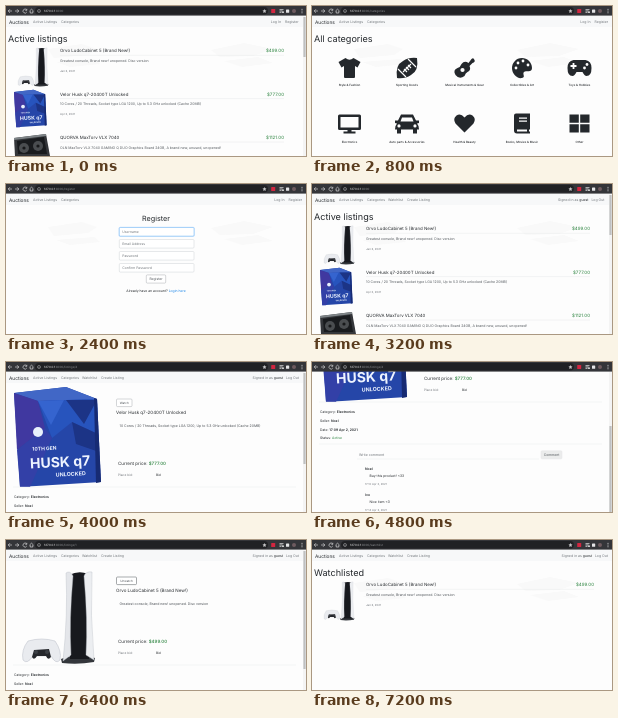
Recreate the animation shown at these times as an HTML page. Size 300 by 150 pixels, loop 8 s.

```html
<!DOCTYPE html>
<html lang="en">
<head>
<meta charset="utf-8">
<title>Auctions</title>
<style>
html, body { margin: 0; width: 100%; height: 100%; overflow: hidden; background: #fcfcfc; }
svg { display: block; width: 100vw; height: 100vh; font-family: Inter, sans-serif; text-rendering: geometricPrecision; }
.page { opacity: 0; animation: show 8s step-end infinite; }
@keyframes show { 0% { opacity: 1 } 10%, 100% { opacity: 0 } }
</style>
</head>
<body>
<svg id="stage" viewBox="0 0 300 150" preserveAspectRatio="none"></svg>
<script>
const INK = '#24282c', GRAY = '#72777c', GREEN = '#27803b', BLUE = '#1683e8', PAPER = '#fdfdfd';
const CONSOLE = 'Orvo LudoCabinet 5 (Brand New!)';
const CHIP = 'Velor Husk q7-20400T Unlocked';
const CARD = 'QUORVA MaxTorv VLX 7040';
const CONSOLE_INFO = 'Greatest console, Brand new! unopened. Disc version';
const CHIP_INFO = '10 Cores / 20 Threads, Socket type LGA 1200, Up to 5.3 GHz unlocked (Cache 20MB)';
const CARD_INFO = 'OLN MaxTorv VLX 7040 GAMING Q DUO Graphics Board 24GB, A brand new, unused, unopened!';

const text = (x, y, size, str, fill = INK, more = '') =>
  `<text x="${x}" y="${y}" font-size="${size}" fill="${fill}" ${more}>${str}</text>`;
const END = 'text-anchor="end"', MID = 'text-anchor="middle"';
const rect = (x, y, w, h, fill, more = '') =>
  `<rect x="${x}" y="${y}" width="${w}" height="${h}" fill="${fill}" ${more}/>`;
const path = (d, fill = INK, more = '') => `<path d="${d}" fill="${fill}" ${more}/>`;
const stroke = (d, color, width) => path(d, 'none', `stroke="${color}" stroke-width="${width}"`);
const circle = (x, y, r, fill = INK) => `<circle cx="${x}" cy="${y}" r="${r}" fill="${fill}"/>`;
const line = (x1, x2, y) => stroke(`M${x1} ${y}H${x2}`, '#e1e3e5', .4);
const group = (transform, body) => `<g transform="${transform}">${body}</g>`;
const bold = str => `<tspan font-weight="600">${str}</tspan>`;
const colored = (str, fill) => `<tspan fill="${fill}">${str}</tspan>`;

const browser = url => rect(0, 0, 300, 9.6, '#343539') +
  rect(29, 1, 233, 7.6, '#202124', 'rx="3.8"') +
  stroke('M6 5H2.2M4 3.2L2.2 5L4 6.8M9 5h3.8M11 3.2L12.8 5L11 6.8', '#e4e4e6', .6) +
  stroke('M20.6 3.8a2 2 0 1 0 .2 2.2M20.8 2.8v1.5h-1.5M23.5 5L25.5 3.2L27.5 5M24.2 5v2h2.6v-2', '#ececee', .6) +
  stroke('M31.5 5a1.5 1.5 0 1 0 3 0a1.5 1.5 0 1 0-3 0M33 4.8v1', '#d0d0d2', .45) +
  text(38, 6.2, 2.95, `127.0.0.1${colored(':8000' + url, '#8e9093')}`, '#f4f4f4') +
  path('M258.5 3l.6 1.3 1.4.2-1 1 .2 1.4-1.2-.7-1.2.7.2-1.4-1-1 1.4-.2z', '#c4c4c6') +
  rect(265.2, 3, 4, 4, '#d22640', 'rx=".6"') +
  stroke('M273.5 3.6h4M273.5 5h3M273.5 6.4h2', '#eee', .7) + circle(277, 6.2, .9, '#eee') +
  rect(280, 3.4, 3.2, 3.4, '#e4e4e6', 'rx=".6"') + circle(288, 5, 2, '#6e5b60') +
  [3.2, 5, 6.8].map(y => circle(296, y, .5, '#eee')).join('');

const blank = rect(0, 0, 300, 150, PAPER);
const backdrop = blank +
  path('M42 43l34-5 15 5-9 6-34 3zM50 56l38-3 6 5-30 3zM205 44l33-7 29 6-20 7-33 1zM218 55l34-4 15 6-31 4z', '#f9f9f9');

function navbar(user, right) {
  const links = [[27, 'Active Listings'], [55, 'Categories']];
  if (user) links.push([76, 'Watchlist'], [95, 'Create Listing']);
  return rect(0, 9.6, 300, 11.4, '#f7f8f9') +
    text(3, 17.5, 4.8, 'Auctions') +
    links.map(([x, s]) => text(x, 17.2, 3.5, s, GRAY)).join('') +
    (user ? text(right - 16, 17.2, 3.5, `Signed in as ${colored('guest', INK)}`, GRAY, END) + text(right, 17.2, 3.5, 'Log Out', GRAY, END)
      : text(right - 17.5, 17.2, 3.5, 'Log In', GRAY, END) + text(right, 17.2, 3.5, 'Register', GRAY, END));
}

const scrollbar = (y, h) => rect(297, 9.6, 3, 140.4, '#f4f4f4') + rect(297.4, y, 2.2, h, '#bfc0c1');
const heading = str => text(2, 35.8, 9.1, str);

// Product pictures, drawn at the size of the listing page.
const consoleArt =
  path('M55 119Q72 112 89 118L88 122Q72 125 56 123Z', '#33363b') +
  path('M63 35Q73 30 82 34L83 119H64Z', '#17191e') +
  path('M60 33Q64 30 67 36Q63 80 65 115L57 121Q62 75 60 33Z', '#e4e6ea', 'stroke="#b9bdc6" stroke-width=".4"') +
  path('M86 32Q80 31 78 36Q82 80 80 115L88 120Q84 75 86 32Z', '#eceef1', 'stroke="#b9bdc6" stroke-width=".4"') +
  path('M22 101Q36 97 49 101Q56 111 54 120Q50 125 45 116H27Q21 125 17 120Q15 110 22 101Z', '#e9ebef', 'stroke="#b9bdc6" stroke-width=".5"') +
  path('M28 110L43 109L45 117Q42 121 40 116H31Q28 121 26 117Z', '#25272c') +
  circle(30, 112, 2, '#3c3f45') + circle(41, 112, 2, '#3c3f45');

const chipArt =
  path('M8 31L60 25L91 37L95 120L14 125Z', '#2546a8') +
  path('M8 31L60 25L91 37L32 39Z', '#4167c6') +
  path('M8 31L32 39L39 66L11 88Z', '#4038a0') +
  path('M32 39L91 37L92 72L66 60L46 76Z', '#2754bd') +
  path('M60 38L91 38L78 62ZM66 60L92 72L93 90L70 82Z', '#1c3486') +
  path('M32 39L58 38L45 63Z', '#3564cf') +
  path('M11 88L39 66L46 76L24 125H14Z', '#3340a7') +
  path('M88 36L91 37L95 120L90 121Z', '#172b73') +
  circle(32, 70, 5, '#e8f0fb') +
  group('rotate(-3 24 102)', [[27, 89, 5, '10TH GEN'], [24, 106.5, 14, 'HUSK q7'], [49, 116, 5.4, 'UNLOCKED']]
    .map(([x, y, size, s]) => text(x, y, size, s, '#eef4ff', 'font-weight="700"')).join(''));

const cardArt = path('M8 132L40 128L44 150H9Z', '#34363a') + path('M11 135L38 131L41 148H12Z', '#191b1e') +
  circle(18, 142, 5, '#4a4d50') + circle(32, 140, 5, '#4a4d50') + circle(18, 142, 1.6, '#17181a') + circle(32, 140, 1.6, '#17181a') +
  path('M8 132L40 128V130L8 134Z', '#7f8588');

const smallConsole = group('translate(5 28.4) scale(.42)', consoleArt);
const smallChip = group('translate(5 74.3) scale(.375)', chipArt);

const listing = (y, right, title, price, info, date) =>
  text(54, y + 1.6, 4.4, title) +
  text(right, y + 1.6, 4.5, price, GREEN, END) +
  line(54, right, y + 4.6) +
  text(54, y + 11, 3.5, info, '#555a5f') +
  text(54, y + 20.8, 2.8, date, GRAY);

const listings = user => backdrop + navbar(user, 292.5) + heading('Active listings') +
  smallConsole + listing(44.7, 278, CONSOLE, '$499.00', CONSOLE_INFO, 'Jan 3, 2021') +
  smallChip + listing(88, 278, CHIP, '$777.00', CHIP_INFO, 'Apr 2, 2021') +
  cardArt + listing(131.5, 278, CARD, '$1121.00', CARD_INFO, '') +
  scrollbar(11, 40) + browser('');

// Category icons, each centred on 0,0.
const hole = 'fill-rule="evenodd"';
const icons = [
  path('M-4-10Q0-6.5 4-10L11-6L8-.5L5.5-2V9Q5.5 10 4.5 10H-4.5Q-5.5 10-5.5 9V-2L-8-.5L-11-6Z'),
  path('M-10 10Q-12-3-4-7Q2-11 10-10Q12 3 4 7Q-2 11-10 10Z') +
    stroke('M-4 4L4-4M-3 1L0 4M-1-1L2 2M1-3L4 0M-9 1L-1 9M1-9L9-1', PAPER, 1.1),
  path('M4-5L7-9Q9-11 10-8Q11-6 8-5L5-2Q7 2 3 4Q1 5 0 8Q-5 12-9 7Q-12 2-7 0Q-4-1-3-4Q0-8 4-5Z') + circle(-2, 2, 2.1, PAPER),
  path('M10 0C10-6 5-10 0-10C-6-10-10-5-10 0C-10 6-5 11 0 10C4 9 0 6 2 4C4 2 10 5 10 0Z') +
    [[-6, 0], [-4, -5], [1, -7], [6, -3]].map(([x, y]) => circle(x, y, 1.4, PAPER)).join(''),
  path('M-6-8H6Q12-7 12 0Q12 8 7 8Q5 8 3 4H-3Q-5 8-7 8Q-12 8-12 0Q-12-7-6-8Z') +
    stroke('M-6-5V1M-9-2H-3', PAPER, 1.8) + circle(5, 0, 1.4, PAPER) + circle(7.5, -3.5, 1.4, PAPER),
  path('M-10-9H10Q11.5-9 11.5-7.5V5Q11.5 6.5 10 6.5H2V8H6V10H-6V8H-2V6.5H-10Q-11.5 6.5-11.5 5V-7.5Q-11.5-9-10-9ZM-9-6.5V4H9V-6.5Z', INK, hole),
  path('M-6-9H6L9-3H12V-.5L10 0Q12 2 12 6H10V10H6V6H-6V10H-10V6H-12Q-12 2-10 0L-12-.5V-3H-9ZM-5-6L-6.5-2H6.5L5-6Z', INK, hole) +
    circle(-8, 2.4, 1.6, PAPER) + circle(8, 2.4, 1.6, PAPER),
  path('M0 9L-9 0Q-12-5-8-8Q-4-11 0-6Q4-11 8-8Q12-5 9 0Z'),
  path('M-6-10H8V6H7V8H8V10H-5Q-8 10-8 7V-8Q-8-10-6-10ZM-5 6V8H5V6ZM-3-6V-4.8H5V-6ZM-3-3V-1.8H5V-3Z', INK, hole),
  path('M-10-9H-.7V-.7H-10ZM.7-9H10V-.7H.7ZM-10 .7H-.7V9H-10ZM.7 .7H10V9H.7Z')
];
const labels = ['Style &amp; Fashion', 'Sporting Goods', 'Musical Instruments &amp; Gear', 'Collectibles &amp; Art', 'Toys &amp; Hobbies',
  'Electronics', 'Auto parts &amp; Accessories', 'Health &amp; Beauty', 'Books, Movies &amp; Music', 'Other'];

const categories = backdrop + navbar(false, 296) + heading('All categories') +
  icons.map((icon, i) => {
    const x = 37.5 + i % 5 * 57.5, y = i < 5 ? 62 : 117.5;
    return group(`translate(${x} ${y})`, icon) + text(x, i < 5 ? 80 : 137, 2.95, labels[i], INK, MID + ' font-weight="500"');
  }).join('') + browser('/categories');

const button = (x, y, w, h, size, str, border = '#a9adb1', fill = '#fff') =>
  rect(x, y, w, h, fill, `rx="1" stroke="${border}" stroke-width=".5"`) +
  text(x + w / 2, y + h / 2 + size * .36, size, str, '#4d5257', MID);

function field(x, y, w, hint, focused, h = 8.6) {
  return (focused ? rect(x - .7, y - .7, w + 1.4, h + 1.4, '#c9e2fc', 'rx="1.6"') : '') +
    rect(x, y, w, h, '#fff', `rx="1" stroke="${focused ? '#6bb2f5' : '#cdd1d5'}" stroke-width=".5"`) +
    text(x + 3, y + h / 2 + 1.2, 3.4, hint, GRAY);
}

function form(title, hints, question, link, url) {
  const bottom = 43.5 + hints.length * 12;
  return backdrop + navbar(false, 296) + text(150, 36.5, 7.2, title, INK, MID) +
    hints.map((hint, i) => field(113.3, 43.5 + i * 12, 74.7, hint, i === 0)).join('') +
    button(140.3, bottom - .6, 19.4, 8.2, 3.4, title) +
    text(150, bottom + 16.8, 3.4, `${question} ${colored(link, BLUE)}`, INK, MID) + browser(url);
}

const details = (art, title, price, info, watch, border) => art +
  button(110.5, 37, watch === 'Watch' ? 15.5 : 20, 7.6, 3, watch, border) +
  text(110, 52.3, 4.5, title) +
  text(113.5, 65.3, 3.5, info, '#4d5257') +
  text(112, 102.6, 4.5, `Current price: <tspan fill="${GREEN}" font-weight="500">${price}</tspan>`) +
  text(112, 114.2, 3.2, 'Place bid:', GRAY) + text(150, 114.2, 3.2, 'Bid') + line(7, 290, 125) +
  text(8, 136.2, 3.4, `Category: ${bold('Electronics')}`) + text(8, 145.2, 3.4, `Seller: ${bold('Noel')}`);

const comment = (y, name, words, date) => text(53, y + .3, 3.4, bold(name)) + text(57.5, y + 6.7, 3.4, words) +
  text(53, y + 15, 2.75, date, GRAY);

const chipPage = details(chipArt, CHIP, '$777.00', CHIP_INFO, 'Watch');
const comments = group('translate(0 -85)', chipPage) +
  text(8, 68.5, 3.4, `Date: ${bold('17:09 Apr 2, 2021')}`) + text(8, 77.3, 3.4, `Status: ${colored('Active', GREEN)}`) +
  line(7, 290, 82) + text(47, 93.9, 3.5, 'Write comment', GRAY) + line(45, 227, 97) +
  button(229, 88.8, 21, 8.2, 3.4, 'Comment', '#e6e7e8', '#ebecec') +
  comment(108, 'Noel', 'Buy this product! &lt;33', '17:10 Apr 2, 2021') +
  comment(134, 'Ivo', 'Nice item &lt;3', '17:14 Apr 3, 2021');

const createPage = backdrop + navbar(true, 296) + text(150, 36.5, 7.2, 'Create listing', INK, MID) +
  field(90, 43.5, 120, 'Title', true) + field(90, 55.5, 120, 'Description', false, 26) +
  field(90, 85, 120, 'Starting bid') + field(90, 97, 120, 'Image URL') + field(90, 109, 120, 'Category') +
  button(140.3, 121, 19.4, 8.2, 3.4, 'Create') + browser('/create');

const pages = [
  listings(false),
  categories,
  form('Log In', ['Username', 'Password'], 'Don’t have an account?', 'Register here', '/login'),
  form('Register', ['Username', 'Email Address', 'Password', 'Confirm Password'], 'Already have an account?', 'Login here', '/register'),
  listings(true),
  blank + navbar(true, 293) + chipPage + scrollbar(11, 91) + browser('/listings/4'),
  blank + comments + scrollbar(64, 86) + browser('/listings/4'),
  createPage,
  blank + navbar(true, 293) + details(consoleArt, CONSOLE, '$499.00', CONSOLE_INFO, 'Unwatch', '#4f5459') + scrollbar(11, 118) + browser('/listings/1'),
  backdrop + navbar(true, 296) + heading('Watchlisted') + smallConsole +
    listing(44.7, 282, CONSOLE, '$499.00', CONSOLE_INFO, 'Jan 3, 2021') + browser('/watchlist')
];

document.getElementById('stage').innerHTML = pages
  .map((body, i) => `<g class="page" style="animation-delay:${i * 800 - 8000}ms">${body}</g>`).join('');
</script>
</body>
</html>
```
